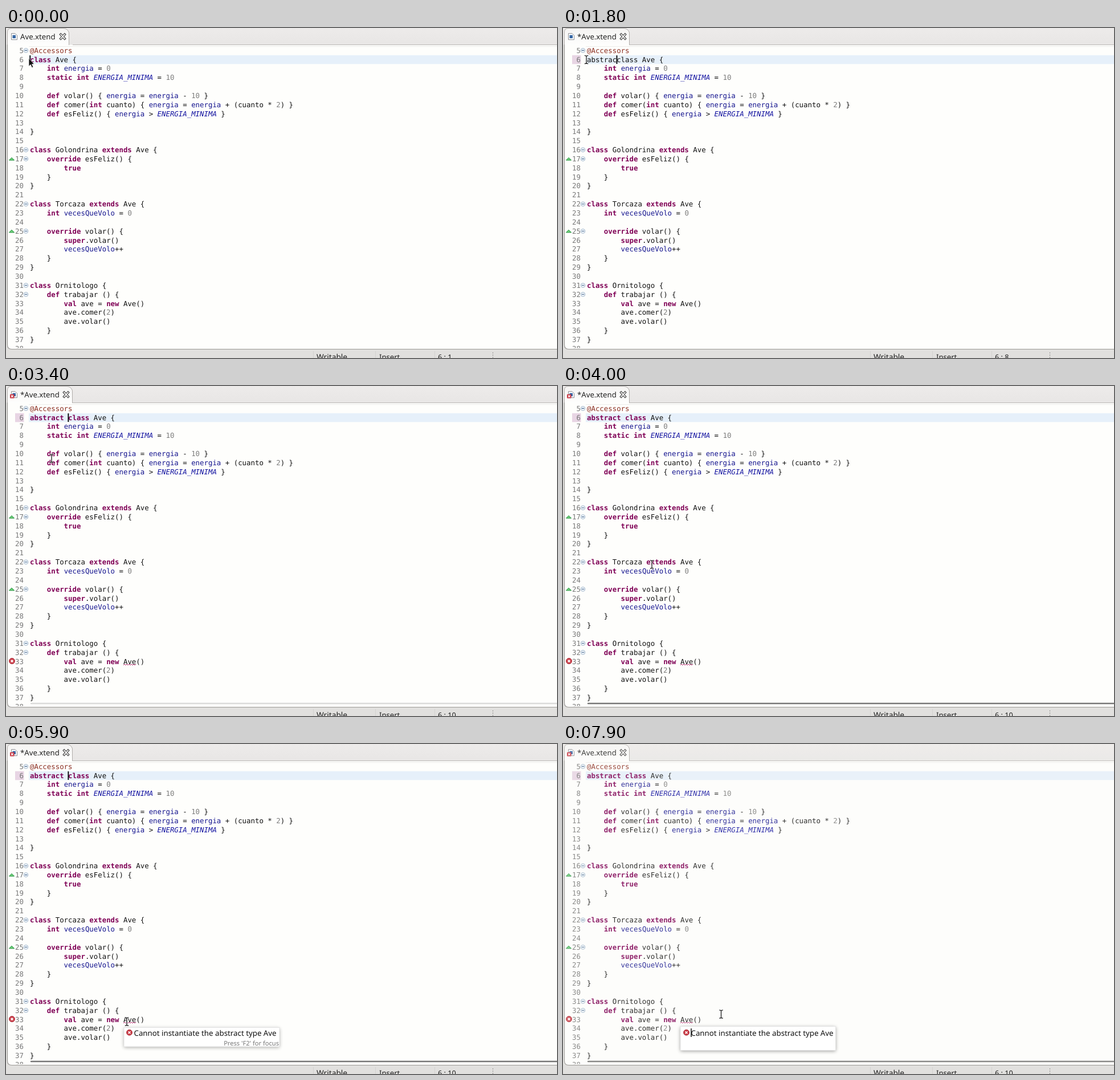
Recreate the animation shown at these times as an HTML page. Size 967x579 px, loop 8 s.

```html
<!DOCTYPE html>
<html lang="es">
<head>
<meta charset="utf-8">
<title>Ave.xtend</title>
<style>
  html, body { margin: 0; width: 100%; height: 100%; overflow: hidden; background: #e1e0de; }
  svg { display: block; width: 967px; height: 579px; text-rendering: geometricPrecision; }
  text { white-space: pre; }
  .code text { font: 12.38px "DejaVu Sans Mono", monospace; fill: #111; }
  .ui { font: 13.3px "Noto Sans", "Open Sans", sans-serif; fill: #222; }
  .code .num { fill: #787878; text-anchor: end; }
  .kw { fill: #7f0055; font-weight: bold; }
  .field { fill: #15158f; }
  .const { fill: #1212a0; font-style: italic; }
  .lit { fill: #7d7d7d; }
  .note { fill: #8c2f22; }
</style>
</head>
<body>
<svg viewBox="0 0 967 579" xmlns="http://www.w3.org/2000/svg">
  <defs>
    <linearGradient id="head" x2="0" y2="1">
      <stop offset="0" stop-color="#edebea"/><stop offset="1" stop-color="#e8e6e5"/>
    </linearGradient>
    <linearGradient id="tabFill" x2="0" y2="1">
      <stop offset="0" stop-color="#f5f4f3"/><stop offset="1" stop-color="#fefefd"/>
    </linearGradient>
    <filter id="shade" x="-10%" y="-50%" width="120%" height="200%"><feGaussianBlur stdDeviation="3.2"/></filter>
    <clipPath id="page"><rect x="3" y="32" width="964" height="529.5"/></clipPath>
    <g id="error">
      <circle r="5" fill="#c93a45" stroke="#a82c38" stroke-width=".8"/>
      <path d="M-2-2L2 2M2-2L-2 2" stroke="#fff" stroke-width="1.5"/>
    </g>
    <g id="fold">
      <circle r="3.8" fill="#f0f5fa" stroke="#a3b8cc" stroke-width="1"/>
      <path d="M-2.2 0H2.2" stroke="#42648a" stroke-width="1.1"/>
    </g>
    <path id="over" d="M-4.5 2.4L0-2.2L4.5 2.4Z" fill="#6fd07a" stroke="#22903c" stroke-width="1" stroke-linejoin="round"/>
    <path id="cross" d="M-3.4-3.6L3.4 3.6M3.4-3.6L-3.4 3.6"/>
    <path id="beam" d="M-3.2-7.2Q-.5-7.2 0-6Q.5-7.2 3.2-7.2M0-6V6M-3.2 7.2Q-.5 7.2 0 6Q.5 7.2 3.2 7.2"/>
  </defs>

  <rect width="967" height="579" fill="#e1e0de"/>
  <path d="M2.5 0H967V563.5H10Q2.5 563.5 2.5 556Z" fill="#fefefc"/>
  <rect x="0" width="967" height="29.5" fill="url(#head)"/>
  <path d="M117 29.5H967" stroke="#bab7b4"/>
  <path d="M40 32.5H967" stroke="#ececea"/>
  <path id="tab" fill="url(#tabFill)" stroke="#b0adaa"/>
  <path d="M2.5 29V556Q2.5 563.5 10 563.5H967" fill="none" stroke="#9b9996" stroke-width="1.2"/>

  <path d="M9.5 9.5H16L19.5 13V20.5H9.5Z" fill="#fbfcfd" stroke="#8d8f94"/>
  <rect x="11.5" y="12.5" width="5.5" height="5.5" fill="#3566a4"/>
  <g id="tabError">
    <rect x="7" y="14.5" width="7.5" height="7" rx="1" fill="#c8323e"/>
    <path d="M9 16.3L12.5 19.7M12.5 16.3L9 19.7" stroke="#fff" stroke-width="1.2"/>
  </g>
  <text id="title" class="ui" x="25" y="19.5" style="font-size:13.2px"></text>
  <g id="close" fill="none" stroke-linecap="square">
    <use href="#cross" stroke="#3b3b3b" stroke-width="4"/>
    <use href="#cross" stroke="#f7f6f5" stroke-width="1.9"/>
  </g>

  <rect x="40" y="47.7" width="927" height="15.6" fill="#e6f0fa"/>
  <rect id="diff" x="16" y="47.7" width="15.5" height="15.6" fill="#e8d5e4"/>
  <g id="code" class="code" clip-path="url(#page)"></g>
  <use id="lineError" href="#error" x="10.5" y="39.3"/>
  <path id="lineWave" fill="none" stroke="#cc2f55"/>
  <use id="typeError" href="#error" x="10.5" y="482.6"/>
  <path id="typeWave" fill="none" stroke="#c23a7c"/>
  <path id="bar" d="M44 557H967" stroke="#777" stroke-width="2.4" stroke-linecap="round"/>
  <rect id="caret" y="48" width="1.8" height="15" fill="#000"/>

  <path d="M539.5 567V579M648.5 567V579M752.5 567V579" stroke="#d3d2d0"/>
  <path d="M854.5 569V579" stroke="#8f8d8b" stroke-dasharray="2 2"/>
  <text class="ui" x="545" y="581.5" style="font-size:13.7px">Writable</text>
  <text class="ui" x="655" y="581.5" style="font-size:13.1px">Insert</text>
  <text id="pos" class="ui" x="758" y="581.5" style="font-size:12.7px"></text>

  <rect id="veil" width="967" height="563" fill="#f6f7ef"/>

  <g id="tip">
    <rect id="tipShade" fill="#000" filter="url(#shade)"/>
    <rect id="tipBox" fill="#fff" stroke="#e2e2e2" stroke-width=".8"/>
    <use href="#error" x="216.5" y="506.2"/>
    <text class="ui" x="224.5" y="511.7" style="fill:#111">Cannot instantiate the abstract type Ave</text>
    <text id="hint" class="ui" x="479" y="529" text-anchor="end" style="font-size:11.1px;fill:#777">Press 'F2' for focus</text>
    <rect id="tipCaret" x="224.3" y="499" width="1.4" height="15" fill="#000"/>
  </g>

  <path id="arrow" d="M40 53V67.2L43.2 64.3L45.5 69.6L47.8 68.6L45.5 63.5H49.6Z" fill="#111" stroke="#fff" stroke-width=".7"/>
  <g id="mouse" fill="none">
    <use href="#beam" stroke="#fff" stroke-opacity=".8" stroke-width="3"/>
    <use href="#beam" stroke="#111" stroke-width="1.25"/>
  </g>
</svg>
<script>
const LOOP = 8000, LEFT = 42, CHAR = 7.453, FIRST = 5, ROW = 15.85;
const $ = id => document.getElementById(id);
const set = (id, attrs) => { for (const k in attrs) $(id).setAttribute(k, attrs[k]); };
const show = (id, on) => set(id, { visibility: on ? 'visible' : 'hidden' });
const baseline = n => 43.7 + ROW * (n - FIRST);

const source = `@Accessors
class Ave {
    int energia = 0
    static int ENERGIA_MINIMA = 10

    def volar() { energia = energia - 10 }
    def comer(int cuanto) { energia = energia + (cuanto * 2) }
    def esFeliz() { energia > ENERGIA_MINIMA }

}

class Golondrina extends Ave {
    override esFeliz() {
        true
    }
}

class Torcaza extends Ave {
    int vecesQueVolo = 0

    override volar() {
        super.volar()
        vecesQueVolo++
    }
}

class Ornitologo {
    def trabajar () {
        val ave = new Ave()
        ave.comer(2)
        ave.volar()
    }
}
`.split('\n');

const styles = [
  ['kw', /^(abstract|class|int|static|def|override|extends|true|super|val|new)$/],
  ['field', /^(energia|vecesQueVolo)$/],
  ['const', /^ENERGIA_MINIMA$/],
  ['lit', /^\d+$/],
  ['note', /^@/]
];
const paint = line => line.replace(/@?\w+|>/g, word => {
  if (word === '>') return '&gt;';
  const hit = styles.find(s => s[1].test(word));
  return hit ? `<tspan class="${hit[0]}">${word}</tspan>` : word;
});

const mark = (id, x, n) => `<use href="#${id}" x="${x}" y="${baseline(n) - 4.3}"/>`;
$('code').innerHTML = source.map((line, i) => {
  const n = i + FIRST, y = baseline(n);
  return `<text class="num" x="31" y="${y}">${n}</text>` +
    `<text id="row${n}" x="${LEFT}" y="${y}">${paint(line)}</text>`;
}).join('') +
  [5, 16, 17, 22, 25, 31, 32].map(n => mark('fold', 35, n)).join('') +
  [17, 25].map(n => mark('over', 10, n)).join('');

function wave(x0, x1, y) {
  let d = `M${x0} ${y}`;
  for (let x = x0 + 2, up = true; x <= x1; x += 2, up = !up) d += `L${x} ${up ? y - 2 : y}`;
  return d;
}
set('lineWave', { d: wave(42, 116, 46.5) });
set('typeWave', { d: wave(206, 229, 490) });

// [time, value] steps, held until the next one
const typing = [[0, 0], [800, 1], [1000, 3], [1400, 4], [1500, 5], [1800, 7], [2500, 8], [2800, 9]];
const blink = [[0, 1], [4000, 0], [4500, 1], [5400, 0], [5700, 1], [6400, 0]];
const tipBlink = [[0, 1], [7200, 0], [7600, 1]];
const held = (steps, t) => steps.filter(s => s[0] <= t).pop()[1];

// time, x, y
const path = [
  [3100, 41, 55.5], [3200, 48, 68], [3400, 80, 127], [3800, 146, 288], [4000, 156, 313],
  [4100, 156, 313], [4200, 176, 358], [4300, 198, 403], [4400, 198, 403], [4700, 207, 446],
  [5100, 219, 487], [5300, 219, 487], [5400, 222, 487], [5500, 212, 487],
  [6800, 212, 487], [7000, 252, 510], [7200, 336, 527], [7400, 432, 524], [7600, 480, 513],
  [7700, 480, 513], [7800, 342, 476], [7900, 277.5, 474]
];
function mouseAt(t) {
  const i = path.findIndex(p => p[0] > t);
  if (i === 0) return path[0].slice(1);
  if (i < 0) return path[path.length - 1].slice(1);
  const a = path[i - 1], b = path[i], k = (t - a[0]) / (b[0] - a[0]);
  return [a[1] + (b[1] - a[1]) * k, a[2] + (b[2] - a[2]) * k];
}

let shown = -1;
function setTyped(n) {
  if (n === shown) return;
  shown = n;
  const dirty = n > 0, shift = dirty ? 6 : 0;
  $('row6').innerHTML = paint('abstract '.slice(0, n) + source[1]);
  $('title').textContent = (dirty ? '*' : '') + 'Ave.xtend';
  $('pos').textContent = '6 : ' + (n + 1);
  set('close', { transform: `translate(${99.5 + shift} 15)` });
  set('tab', { d: `M2.5 30V7Q2.5 .5 9 .5H${101 + shift}Q${108 + shift} 1 ${110.5 + shift} 8V30` });
  set('caret', { x: LEFT + n * CHAR - .6 });
  show('diff', dirty);
}

function draw(now) {
  const t = Math.floor(now % LOOP / 100) * 100;
  setTyped(held(typing, t));
  show('caret', held(blink, t));
  show('tabError', t >= 2800);
  show('lineError', t >= 2600 && t < 3200);
  show('lineWave', t >= 2600 && t < 3200);
  show('typeError', t >= 3200);
  show('typeWave', t >= 3200);
  set('bar', { opacity: Math.min(1, Math.max(0, (t - 3200) / 800)) });
  set('veil', { opacity: t >= 6600 ? .14 : 0 });

  const focused = t >= 6400;
  const box = focused
    ? { x: 206, y: 495.5, width: 272.5, height: 42 }
    : { x: 207, y: 497.5, width: 273, height: 33.5 };
  set('tip', { display: t >= 5900 ? 'inline' : 'none' });
  set('tipBox', box);
  set('tipShade', { ...box, y: box.y + 1.5, opacity: focused ? .38 : .32 });
  show('hint', !focused);
  show('tipCaret', focused && held(tipBlink, t));

  show('arrow', t < 100);
  show('mouse', t >= 100);
  set('mouse', { transform: `translate(${mouseAt(t)})` });
}

function tick(now) {
  draw(now);
  requestAnimationFrame(tick);
}
draw(0);
requestAnimationFrame(tick);
</script>
</body>
</html>
```
